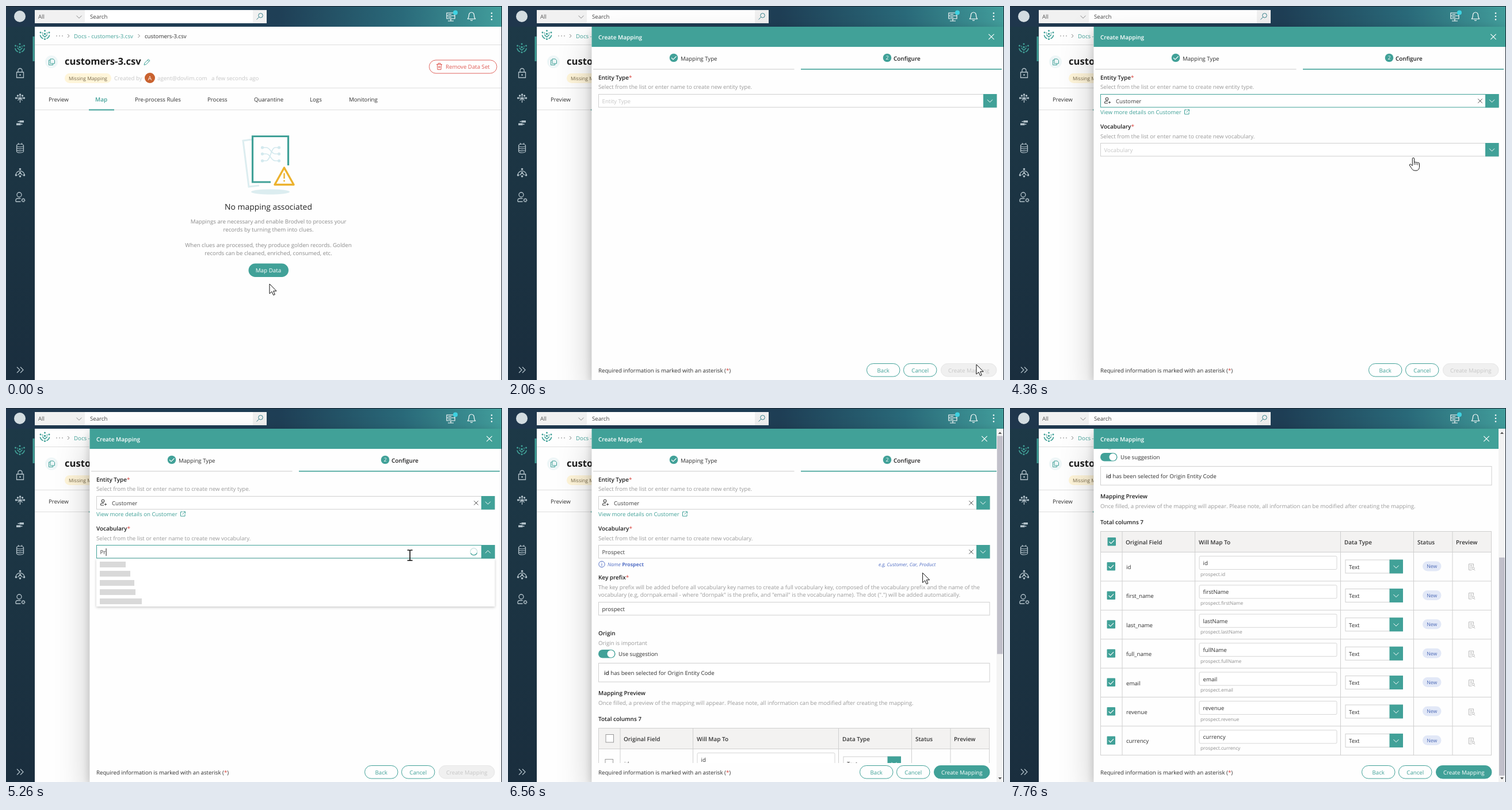
Recreate the animation shown at these times as an HTML page. Size 862x650 px, loop 8000 ms.

```html
<!DOCTYPE html>
<html lang="en">
<head>
<meta charset="utf-8">
<title>Create mapping</title>
<style>
html, body { margin: 0; width: 100%; height: 100%; overflow: hidden; background: #fefefe; }
svg { display: block; }
text { font-family: "Open Sans", "Noto Sans", sans-serif; text-rendering: geometricPrecision; white-space: pre; }
</style>
</head>
<body>
<svg id="stage" width="862" height="650" viewBox="0 0 862 650">
  <defs>
    <linearGradient id="bar">
      <stop offset="0" stop-color="#1f364c"/><stop offset=".55" stop-color="#1f3f56"/>
      <stop offset=".8" stop-color="#2a6a7a"/><stop offset="1" stop-color="#429e9c"/>
    </linearGradient>
    <linearGradient id="side" x2="0" y2="1">
      <stop offset="0" stop-color="#1d3947"/><stop offset="1" stop-color="#1a2e3e"/>
    </linearGradient>
    <filter id="deep" x="-15%" y="-15%" width="130%" height="130%" color-interpolation-filters="sRGB">
      <feDropShadow in="SourceGraphic" dx="0" dy="25.6" stdDeviation="28.8" flood-opacity=".22" result="far"/>
      <feDropShadow in="SourceGraphic" dx="0" dy="4.8" stdDeviation="7.2" flood-opacity=".18" result="near"/>
      <feMerge><feMergeNode in="far"/><feMergeNode in="near"/></feMerge>
    </filter>
    <filter id="drop" x="-5%" y="-5%" width="110%" height="115%" color-interpolation-filters="sRGB">
      <feDropShadow dx="0" dy="1.5" stdDeviation="2" flood-opacity=".22"/>
    </filter>
  </defs>
  <g id="base"></g>
  <g id="live"></g>
  <path d="M0 .5H862M861.5 0V650" stroke="#16222e" fill="none"/>
</svg>
<script>
const LOOP = 8000, TEAL = '#41a198', DARK = '#2f2f2f', GREY = '#9a9a9a', LINE = '#cfcfcf', RED = '#d8433c';
const MID = 'text-anchor="middle"', END = 'text-anchor="end"', BOLD = 'font-weight="600"';
const ROUND = 'stroke-linecap="round" stroke-linejoin="round"';

const R = (x, y, w, h, fill, o = '') => `<rect x="${x}" y="${y}" width="${w}" height="${h}" fill="${fill}" ${o}/>`;
const C = (x, y, r, fill, o = '') => `<circle cx="${x}" cy="${y}" r="${r}" fill="${fill}" ${o}/>`;
const P = (d, stroke, w = 1, o = '') => `<path d="${d}" fill="none" stroke="${stroke}" stroke-width="${w}" ${o}/>`;
const G = (x, y, body) => `<g transform="translate(${x} ${y})">${body}</g>`;
const clip = (x, y, w, h, body) =>
  `<svg x="${x}" y="${y}" width="${w}" height="${h}" viewBox="${x} ${y} ${w} ${h}">${body}</svg>`;
// y is the middle of the capitals
const T = (x, y, s, fill = DARK, size = 9.68, o = '') =>
  `<text x="${x}" y="${(y + size * .37).toFixed(2)}" font-size="${size}" fill="${fill}" ${o}>${s}</text>`;
const bold = (x, y, s, fill = '#1f1f1f', o = '') => T(x, y, s, fill, 9.95, BOLD + ' ' + o);
const star = `<tspan fill="${RED}" font-weight="400">*</tspan>`;
const box = (x, y, w, h, stroke, fill = '#fff', o = '') => R(x + .5, y + .5, w - 1, h - 1, fill, `stroke="${stroke}" ${o}`);
const chevron = (x, y, up, c = '#fff', r = 4.5) => P(`M${x - r} ${y + (up ? r / 2 : -r / 2)}l${r} ${up ? -r : r}l${r} ${up ? r : -r}`, c, 1);
const cross = (x, y, r, c, w = 1) => P(`M${x - r} ${y - r}l${2 * r} ${2 * r}m0 ${-2 * r}l${-2 * r} ${2 * r}`, c, w);
const tick = (x, y) => P(`M${x - 4} ${y}l3 3l5.5 -5.5`, '#fff', 1.1);

const clamp = (v, a = 0, b = 1) => Math.min(b, Math.max(a, v));
const inOut = u => u < .5 ? 2 * u * u : 1 - 2 * (1 - u) * (1 - u);
const pen = document.createElement('canvas').getContext('2d');
const widthOf = s => { pen.font = '9.68px "Open Sans", "Noto Sans", sans-serif'; return pen.measureText(s).width; };

// ---------- icons ----------
const fan = c => P('M-8 1Q-7 5 -3.5 6.5M8 1Q7 5 3.5 6.5M-4 0L0 4L4 0', c, 1.6, ROUND) +
  [[0, -7, 1.5], [0, -1.5, 1.8], [-7.5, -4, 1.5], [7.5, -4, 1.5], [-4, -3, 1], [4, -3, 1], [0, 7.5, 1.6]].map(d => C(...d, c)).join('');
const db = c => P('M-6 -5a6 2.5 0 0 1 12 0a6 2.5 0 0 1 -12 0V5a6 2.5 0 0 0 12 0V-5M-6 -1.7a6 2.5 0 0 0 12 0M-6 1.7a6 2.5 0 0 0 12 0', c, 1.2);
const mask = c => P('M-7 0c0 -5 14 -5 14 0c0 5 -5 4 -7 1.5c-2 2.5 -7 3.5 -7 -1.5Z', c, 1.2) + C(-3, -.3, 1.3, 'none', `stroke="${c}"`) + C(3, -.3, 1.3, 'none', `stroke="${c}"`);
const sync = c => P('M-6 -2A6.3 6.3 0 0 1 5 -4M6 2A6.3 6.3 0 0 1 -5 4M5.5 -7V-3.5H2M-5.5 7V3.5H-2', c, 1.2) + C(0, 0, 1.9, 'none', `stroke="${c}" stroke-width="1.3"`);
const person = c => C(-.5, -3, 2.3, 'none', `stroke="${c}" stroke-width="1.1"`) + P('M-4.5 4.5V3Q-4.5 1 -2 1H1M-4.5 4.5H1M2 3H6M4 1V5', c, 1.1);
const glass = c => C(1.5, -1.5, 3.8, 'none', `stroke="${c}"`) + P('M-1.3 1.3L-5.5 5.5', c);

function sideIcons() {
  const c = '#b4c3cb', w = 1.3;
  return G(24, 73, fan(TEAL)) +
    G(24.5, 117, P('M-6 -2H6V7.5H-6ZM-3.5 -2V-5a3.5 3.5 0 0 1 7 0V-2', c, w) + C(0, 2.8, 1.4, c)) +
    G(24.5, 160, P('M0 8V-5M-7 0H7M-4 4L0 0L4 4', c, w) + [[0, -6], [-7, 0], [7, 0], [-4, -4], [4, -4]].map(p => C(...p, 1.7, c)).join('')) +
    G(24.5, 203, P('M-1 -2.3H6.5M-6.5 2.5H1', c, 3.6) + P('M-4 -2.3H-1M1 2.5H4', c, 1.5)) +
    G(24.5, 247.5, db(c) + P('M-3 -7V-9.5M3 -7V-9.5', c, w)) +
    G(24.5, 290, P('M-7.5 3A7.6 7.6 0 0 1 7.5 3M-4 4L0 0L4 4', c, w) + [[0, -6.5], [0, 0], [-7, 4], [7, 4], [0, 6]].map(p => C(...p, 1.8, c)).join('')) +
    G(24.5, 332.5, C(-1.5, -4.5, 4, 'none', `stroke="${c}" stroke-width="${w}"`) + P('M-7.5 7.5V5Q-7.5 2 -4 2H1M-7.5 7.5H1', c, w) +
      C(5.5, 5, 2.4, 'none', `stroke="${c}" stroke-width="2" stroke-dasharray="1.4 .5"`)) +
    P('M19 627.5l5 5l-5 5M25 627.5l5 5l-5 5', c, 1.2);
}

function illustration() {
  const ice = '#dcedf0';
  let s = P('M427 232L412 234L422 314L440 312', ice, 3) + `<ellipse cx="459.500" cy="323" rx="33.500" ry="4.500" fill="${ice}"/>` +
    R(428.5, 226.5, 62, 80, '#fefefe') + P('M460 306H428.500V226.500H490.500V277', TEAL, 3.2);
  for (const [a, b] of [[246, 257], [257, 269], [269, 246]]) {
    s += C(445.5, a, 2.6, '#d3e9ee') + C(474.5, a, 2.6, '#d3e9ee') + P(`M448 ${a}H452C460 ${a} 460 ${b} 468 ${b}H474`, '#d3e9ee', 1.6);
  }
  return s + `<path d="M483.500 281L500 310.500H467Z" fill="#fefefe" stroke="#ecb22e" stroke-width="3.400" stroke-linejoin="round"/>` +
    P('M483.500 290.500V300', '#ecb22e', 2.4) + C(483.5, 304, 1.4, '#ecb22e');
}

function basePage() {
  let s = R(0, 0, 862, 650, '#fefefe') + R(0, 36, 50, 614, 'url(#side)') + R(0, 0, 862, 36, 'url(#bar)') +
    C(24, 18, 10, '#d3dce1') + R(50, 7, 87, 23, '#f1f1f1') + R(137, 7, 292, 23, '#fff') + R(429, 7, 24, 23, '#f1f1f1') +
    T(56, 18, 'All', '#555') + chevron(127, 19, false, '#888') + T(146, 18.5, 'Search', '#444') + G(441, 18, glass('#34808a'));
  s += G(773, 18, P('M-7 -6H7V-1H-7ZM-7 -1H7V4H-7ZM0 4V8M-5 8H5', '#fff', 1.2) + P('M-4.500 -3.500H1M-4.500 1.500H1', '#fff')) + C(781, 11.5, 4, '#3fd3e2') +
    G(809, 18, P('M-6.500 4.500Q-4.500 2 -4.500 -2A4.500 5 0 0 1 4.500 -2Q4.500 2 6.500 4.500ZM-1.800 6.500Q0 8 1.800 6.500', '#fff', 1.2)) +
    [12.5, 18, 23.5].map(y => C(844, y, 1.3, '#fff')).join('');
  s += R(46.5, 53, 3, 43, TEAL) + sideIcons();
  s += G(67.5, 50, fan(TEAL)) + [88, 93, 98].map(x => C(x, 52, .8, '#777')).join('') + P('M107 49l3 3l-3 3M229.500 49l3 3l-3 3', '#888') +
    T(118, 52, 'Docs - customers-3.csv', TEAL) + T(241, 52.5, 'customers-3.csv') + P('M50 67.500H861M50 142.500H861M50 180.500H861', '#dedede');
  s += C(79, 97, 11, '#eef6f7') + P('M77 92H82L84.500 94.500V100H77ZM77 94H74.500V102.500H81.500V100', TEAL) +
    T(102, 96, 'customers-3.csv', '#1c1c1c', 16.6, 'font-weight="700"') +
    P('M240 102.500L241 99L247.500 92.500L250 95L243.500 101.500ZM246 94L248.500 96.500', TEAL) +
    R(102, 117, 81, 17, '#fff5d9', 'rx="8.500"') + T(109, 125.5, 'Missing Mapping', '#77694b', 8.5) +
    T(188, 125.5, 'Created by', '#c6c6c6') + C(250, 125, 9, '#c9622f') + T(250, 125.3, 'A', '#fff', 10, MID) +
    T(263, 125.5, 'agent@dovlim.com', '#c6c6c6') + T(357, 125.5, 'a few seconds ago', '#c6c6c6');
  s += box(735, 93.5, 118.5, 24, '#e0655e', '#fefefe', 'rx="11.500"') + T(764, 105.5, 'Remove Data Set', '#df5a53') +
    P('M748 101.500H758M751 101V99.500H755V101M749.500 102L750 110.500H756L756.500 102M752 104V108M754 104V108', '#df5a53');
  [[74, 'Preview'], [224, 'Pre-process Rules'], [350, 'Process'], [431, 'Quarantine'], [528, 'Logs'], [596, 'Monitoring']].forEach(([x, n]) => s += T(x, 162, n));
  s += bold(155, 162, 'Map', TEAL) + R(144, 179.5, 44, 2, TEAL) + illustration() + T(456, 348.5, 'No mapping associated', '#222', 13.9, MID);
  [[374, 'Mappings are necessary and enable Brodvel to process your'], [388, 'records by turning them into clues.'],
   [415.5, 'When clues are processed, they produce golden records. Golden'], [429.5, 'records can be cleaned, enriched, consumed, etc.']]
    .forEach(([y, n]) => s += T(456, y, n, '#8a8a8a', 9.68, MID));
  return s;
}

// ---------- panel parts ----------
function pill(x, w, label, kind, hover) {
  const [fill, line, ink] = { solid: [hover ? '#378a82' : TEAL, hover ? '#378a82' : TEAL, '#fff'], line: ['#fefefe', TEAL, TEAL], off: ['#f0f0f0', '#e6e6e6', '#c6c6c6'] }[kind];
  return box(x, 621, w, 23.5, line, fill, 'rx="11.250"') + T(x + w / 2, 633, label, ink, 9.68, MID);
}

function tabs(step) {
  const first = step === 1;
  return R(148, 109, 349.5, 1.6, first ? TEAL : '#dedede') + R(509, 109, 349, 1.6, first ? '#dedede' : TEAL) + C(288, 90, 7.3, TEAL) +
    (first ? T(288, 90, '1', '#fff', 9, MID) + bold(299, 91, 'Mapping Type') : tick(288, 90) + T(300, 91, 'Mapping Type')) +
    C(659, 90, 7.3, first ? '#dedede' : TEAL) + T(659, 90, '2', '#fff', 9, MID) +
    (first ? T(670, 91, 'Configure') : bold(670, 91, 'Configure'));
}

function typePage(t) {
  const opts = [['Auto Mapping', 'Brodvel will automatically map the Data Set for you. You can modify this mapping once created.'],
    ['Manual Mapping', 'Brodvel will create an empty mapping configuration. You will have full control over the mapping and how each field for your Data Set will generate records.'],
    ['Existing Mapping', 'Reuse an already existing mapping. This is useful for mapping the same Data Set or a Data Set with the same data structure.']];
  return tabs(1) + bold(157, 124, 'Mapping Type') + opts.map(([n, d], i) => {
    const y = 149 + 34.4 * i;
    return C(164.5, y, 7, '#fff', `stroke="${i ? '#8a8a8a' : TEAL}"`) + (i ? '' : C(164.5, y, 4.6, TEAL)) +
      T(176, y + .3, n, DARK, 9.85) + T(176, y + 13.7, d, '#7f7f7f', 8.3, 'letter-spacing=".3"');
  }).join('') + pill(727, 58, 'Cancel', 'line') + pill(791, 58.5, 'Next', 'solid', t > 1800);
}

function field(y, right, o) {
  const line = o.focus ? TEAL : LINE;
  let s = box(157, y, right - 156.5, 23.5, line) + R(right - 23, y, 23.5, 23.5, TEAL) + chevron(right - 11.5, y + 12, o.open);
  const x = o.icon ? 184 : 163.5;
  if (o.icon) s += G(169, y + 11.5, person('#444'));
  s += o.value ? T(x, y + 12.3, o.value, '#3c3c3c') : T(x, y + 12.3, o.hint, '#c6c6c6');
  if (o.caret) { const cx = x + widthOf(o.value) + .8; s += P(`M${cx} ${y + 6}v13`, '#222'); }
  if (o.clear) s += cross(right - 32, y + 12, 3.7, '#555');
  if (o.spin !== undefined) s += G(right - 36, y + 11.7, C(0, 0, 6, 'none', 'stroke="#c9e5e2" stroke-width="1.300"') +
    `<g transform="rotate(${o.spin})">${P('M0 -6A6 6 0 0 1 4.200 4.200', TEAL, 1.3)}</g>`);
  return s;
}

const sheet = (y, h) => R(157, y, 692.5, h, '#fff', 'filter="url(#drop)"');
const skeleton = y => sheet(y, 83) + [45, 53, 60, 62, 73].map((w, i) => R(163, y + 5 + 16 * i, w, 10, '#d9d9d9')).join('');

function list(y, head, rows, hover = -1) {
  const body = rows.map(([icon, name, path, n], i) => {
    const b = y + 41 * i;
    return (i === hover ? R(157, b + 24, 680, 41, '#f1f3f3') : '') + G(170, b + 44.5, icon('#444')) + T(183.5, b + 37.6, name, '#444') +
      T(183.5, b + 54, path, GREY, 8.2) + T(824.5, b + 37.6, n, n === '0' ? '#999' : '#444', 9.68, END);
  }).join('');
  return sheet(y, 218) + clip(157, y, 693, 218, body + T(163, y + 12, head, '#8d8d8d', 8.3) +
    box(779, y + 5, 29, 14, '#c4c4c4', '#d2d2d2', 'rx="6.500"') + C(786, y + 12, 6.3, '#fff', 'stroke="#bbb" stroke-width=".7"') + T(814, y + 12.3, 'All', TEAL, 9.68, BOLD) +
    R(837, y, 12.5, 218, '#f5f5f5') + R(838, y + 11, 10, 93, '#c1c0cc') +
    `<path d="M840.500 ${y + 8}h5l-2.500 -3zM840.500 ${y + 210}h5l-2.500 3z" fill="#555"/>`);
}

const longNumber = '1234567890'.repeat(9).slice(0, 89) + '12345678910';
const entry = (icon, name, n) => [icon, name, '/' + name.replace(/ /g, ''), n];
const allTypes = [[mask, longNumber, '/A' + longNumber.slice(1), '0'], entry(db, 'Academic Period', '3k+'),
  entry(db, 'Academic Period Detail', '1'), entry(db, 'Accomplishments', '0'), entry(sync, 'Account', '13')];
const found = [entry(person, 'Business Customer', '0'), entry(person, 'Customer', '13'), entry(person, 'Customer Contact', '1'),
  entry(person, 'Customer Group', '0'), entry(person, 'Customer Order', '0')];
const vocabularies = ['Academic Period', 'Accomplishments', 'Account', 'Address', 'Agreement'].map(n => entry(db, n, '0'));

const typed = (word, start, step, t) => word.slice(0, Math.max(0, Math.floor((t - start) / step) + 1));

function check(x, y, on) {
  return on ? R(x, y, 14.5, 14.5, TEAL, 'rx="1"') + tick(x + 7, y + 7.5) : box(x, y, 14.5, 14.5, '#999');
}

function table(ready) {
  const top = 556.5, first = 592.5, step = 50.4;
  const cols = [157.5, 195, 321.5, 574.5, 701.5, 769, 836.5], bottom = first + 7 * step;
  let s = R(157, top, 680, first - top, '#f3f2f1') + check(169.5, 567, ready);
  ['Original Field', 'Will Map To', 'Data Type', 'Status', 'Preview'].forEach((n, i) => s += bold([201, 328, 581, 708, 775][i], 575, n, '#333'));
  ['id', 'first_name', 'last_name', 'full_name', 'email', 'revenue', 'currency'].forEach((n, i) => {
    const y = first + i * step, key = n.replace(/_n/, 'N');
    s += T(202, y + 26, n) + box(328.5, y + 6.5, 240, 24, '#d6d6d6', '#fff', 'rx="2"') + T(335.5, y + 19, key) +
      T(331, y + 38, 'prospect.' + key, '#8d8d8d', 8.25) + box(582.5, y + 13, 100, 24, LINE) + R(659.5, y + 13, 23.5, 24, TEAL) +
      chevron(671, y + 25.5, false) + T(589, y + 25.7, 'Text') + check(168.5, y + 17.5, ready);
    if (ready) s += R(717, y + 16, 32.5, 17, '#e2e8f7', 'rx="8.500"') + T(733.2, y + 24.7, 'New', '#4a68b5', 8.7, MID) +
      G(802.5, y + 26, P('M-5 5V-5.500H3V-1M-5 5H0M-3 -3H1M-3 -.500H1M-3 2H-1', '#b9b9b9') + C(2.5, 2.2, 2, 'none', 'stroke="#b9b9b9"') + P('M4 4L5.500 6', '#b9b9b9'));
  });
  s += cols.map(x => P(`M${x} ${top}V${bottom}`, LINE)).join('') + P(`M157 ${top}H837`, LINE);
  for (let i = 0; i < 8; i++) s += P(`M157 ${first + i * step}H837`, LINE);
  return s;
}

function details(right, t) {
  const note = (y, s) => T(157, y, s, GREY);
  let s = C(163, 271.5, 5.2, 'none', 'stroke="#5470c6"') + P('M163 270.500V274.500M163 268.500V269.500', '#5470c6') +
    T(173, 272, 'Name <tspan font-weight="700" font-style="normal">Prospect</tspan>', '#5470c6', 8.7, 'font-style="italic"') +
    T(644, 272, 'e.g, Customer, Car, Product', '#5470c6', 8.3, 'font-style="italic"') +
    bold(157, 294, 'Key prefix' + star) +
    note(311, 'The key prefix will be added before all vocabulary key names to create a full vocabulary key, composed of the vocabulary prefix and the name of the') +
    note(324.3, 'vocabulary (e.g, dornpak.email - where "dornpak" is the prefix, and "email" is the vocabulary name). The dot (".") will be added automatically.') +
    box(157, 337, right - 156.5, 23.5, LINE) + T(163.5, 349.3, 'prospect') + bold(157, 391, 'Origin') + note(408, 'Origin is important') +
    R(157, 420, 29.5, 14.5, TEAL, 'rx="7.250"') + C(178.8, 427.2, 6.3, '#fff') + T(192, 427.5, 'Use suggestion') +
    box(157, 443, right - 156.5, 33.5, LINE) + T(167, 460, `<tspan ${BOLD}>id</tspan> has been selected for Origin Entity Code`) +
    bold(157, 495.3, 'Mapping Preview') +
    note(512.3, 'Once filled, a preview of the mapping will appear. Please note, all information can be modified after creating the mapping.');
  if (t >= 6530) s += bold(157, 540.5, 'Total columns 7') + table(t >= 6830);
  return s;
}

function configPage(t, right, scroll) {
  const chosen = t >= 4260, done = t >= 6230, spin = (t * .5) % 360;
  const note = what => `Select from the list or enter name to create new ${what}.`;
  const open1 = t >= 2470 && !chosen, open2 = t >= 5000 && !done;
  const name = chosen ? 'Customer' : typed('Customer', 3200, 70, t);
  const vocab = done ? 'Prospect' : typed(t < 5800 ? 'Prospec' : 'Prospect', 5160, 75, t);
  const busy1 = open1 && (t < 2630 || t >= 3230 && t < 3790);
  const busy2 = open2 && (t < 5080 || t >= 5160 && t < 5920);

  let s = tabs(2) + bold(157, 124, 'Entity Type' + star) + T(157, 140.5, note('entity type'), GREY) +
    field(153, right, { value: name, hint: 'Entity Type', icon: chosen, clear: chosen, focus: t >= 2470 && t < 4400, open: open1,
      caret: open1 && (t < 2960 || t >= 3200), spin: busy1 ? spin : undefined });
  if (chosen) {
    s += T(157, 184, 'View more details on Customer', TEAL) + P('M307 180.500H303.500V188H311V184.500M308 180H311.500V183.500M311.500 180L306.500 185', TEAL) +
      bold(157, 209, 'Vocabulary' + star) + T(157, 226, note('vocabulary'), GREY) +
      field(238, right, { value: vocab, hint: 'Vocabulary', clear: done, focus: open2, open: open2, caret: open2, spin: busy2 ? spin : undefined });
  }
  if (done) s += details(right, t);
  if (open1) s += busy1 ? skeleton(177) : t < 3230 ? list(177, 'Showing 10 of 1043', allTypes) : list(177, 'Showing 10 of 24', found, t > 4120 ? 1 : -1);
  if (open2) s += busy2 ? skeleton(262) : t < 5160 ? list(262, 'Showing 10 of 218', vocabularies) :
    sheet(262, 41) + R(157, 264, 692, 37, t > 6080 ? '#f1f3f3' : '#fff') + T(163.5, 283, 'Prospect');

  const k = right - 849;
  return clip(146, 71, 715, 546, G(0, -scroll, s)) +
    T(157, 633, `Required information is marked with an asterisk (<tspan fill="${RED}">*</tspan>)`) +
    pill(623 + k, 58.5, 'Back', 'line') + pill(687 + k, 58.5, 'Cancel', 'line') + pill(752 + k, 97.5, 'Create Mapping', done ? 'solid' : 'off');
}

// the page scrolls in thirtieths of a second
function scrollAt(t) {
  const step = 1000 / 30, held = 7460 + Math.floor((t - 7460) / step + .01) * step;
  return t < 7460 ? 0 : 342 * inOut(clamp((held - 7440) / 320));
}

function panel(t) {
  const wide = t < 6530, right = wide ? 849 : 837, scroll = scrollAt(t);
  const slide = 715 * (1 - clamp((t - 1070) / 130)) ** 4;
  let s = R(145.5, 36, 716, 614, '#fefefe', 'filter="url(#deep)"');
  s += t < 2000 ? typePage(t) : configPage(t, right, scroll);
  s += R(145.5, 36, 716, 35, TEAL) + bold(157, 54.3, 'Create Mapping', '#fff') + cross(right - 9, 53.5, 4.7, '#fff', 1.1);
  if (!wide) s += R(849, 36, 12.5, 614, '#f3f3f3') + R(850, 48.5 + scroll * .618, 10, 379, '#c1c0ca') +
    '<path d="M852 45h6l-3 -3.500zM852 642h6l-3 3.500z" fill="#555"/>';
  return G(slide.toFixed(2), 0, s);
}

// ---------- pointer ----------
const shapes = {
  arrow: '<path d="M0 0V17L4 13.300L6.700 19.500L9.300 18.400L6.700 12.300H12Z" fill="#fff" stroke="#111"/>',
  hand: '<path d="M-1.700 13.500V1.600a1.700 1.700 0 0 1 3.400 0V8a1.600 1.600 0 0 1 3 .400a1.600 1.600 0 0 1 3 .600a1.500 1.500 0 0 1 2.800 .800V15c0 4 -2 7 -5.500 7H2.500C-.500 22 -2 20 -3.500 17.500L-6.500 13c-.800 -1.500 1 -3 2.300 -1.600Z" fill="#fff" stroke="#111" stroke-linejoin="round"/>' +
    P('M1.700 8V12M4.700 8.500V12M7.700 9.500V12.500', '#111', .9),
  beam: P('M-4.500 -9H-1.500Q0 -9 0 -7.500Q0 -9 1.500 -9H4.500M-4.500 9H-1.500Q0 9 0 7.500Q0 9 1.500 9H4.500M0 -8V8', '#111', 1.6)
};
const moves = [[700, 960, 458, 460], [1500, 1830, 814, 623], [2330, 2470, 708, 168], [4000, 4180, 701, 264],
  [4860, 4990, 702, 256], [5960, 6120, 692, 284], [6530, 6640, 872, 300]];
const looks = [[0, 'arrow'], [830, 'hand'], [1530, 'arrow'], [1790, 'hand'], [2020, 'arrow'], [2440, 'beam'], [4060, 'hand'],
  [4600, 'arrow'], [4930, 'beam'], [6020, 'hand'], [6300, 'arrow']];

function pointer(t) {
  let x = 458, y = 483;
  for (const [a, b, px, py] of moves) {
    const u = inOut(clamp((t - a) / (b - a)));
    x += (px - x) * u; y += (py - y) * u;
  }
  return x > 866 ? '' : G(x.toFixed(1), y.toFixed(1), shapes[looks.filter(l => t >= l[0]).pop()[1]]);
}

const live = document.getElementById('live');
document.getElementById('base').innerHTML = basePage();
let last = '';

function draw(t) {
  const button = R(421.5, 447.5, 69.5, 23.5, t >= 830 ? '#378a82' : TEAL, 'rx="11.750"') + T(456, 459.7, 'Map Data', '#fff', 9.85, MID);
  const now = button + (t >= 1090 ? panel(t) : '') + pointer(t);
  if (now !== last) live.innerHTML = last = now;
}

const began = performance.now();
function tickFrame() {
  draw((performance.now() - began) % LOOP);
  requestAnimationFrame(tickFrame);
}
tickFrame();
</script>
</body>
</html>
```
